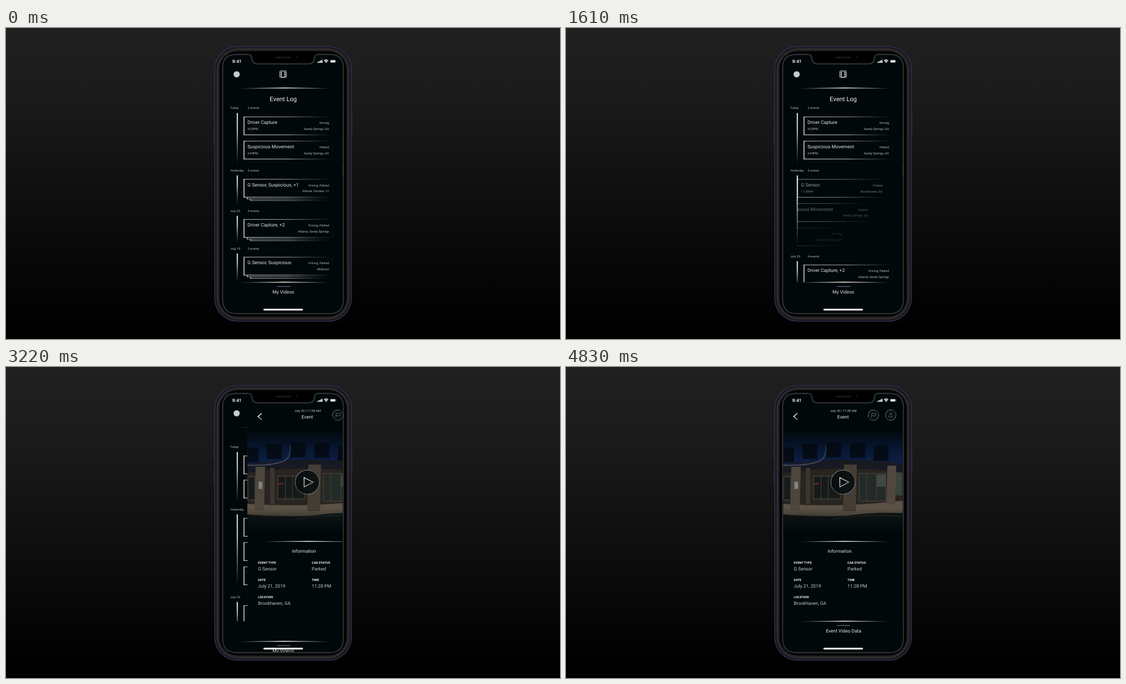
Animation, 998 px wide and 561 px high, one loop 4.9 s. Source, as an HTML page:

```html
<!DOCTYPE html>
<html lang="en">
<head>
<meta charset="utf-8">
<title>Event log</title>
<style>
html, body { margin: 0; width: 100%; height: 100%; overflow: hidden; background: #000; }
svg { display: block; width: 100vw; height: 100vh; }
text { font-family: Roboto, "Open Sans", sans-serif; text-rendering: geometricPrecision; white-space: pre; }
.clock { font-family: Inter, sans-serif; }
</style>
</head>
<body>
<svg id="stage" viewBox="0 0 998 561"></svg>
<script>
const BG = '#01080a';
const SCREEN = 'M391.5 72Q391.5 49 414 49H436Q441 49 441.5 54C442 62 446 66 453 66H545C552 66 556.5 62 557 54'
  + 'Q557.5 49 562 49H584Q606.5 49 606.5 72V490Q606.5 514 582 514H416Q391.5 514 391.5 490Z';

const gradient = (id, dir, stops) => `<linearGradient id="${id}" ${dir}>` + stops.map(([at, color, alpha = 1]) =>
  `<stop offset="${at}" stop-color="${color}" stop-opacity="${alpha}"/>`).join('') + '</linearGradient>';
const down = 'x2="0" y2="1"';
const rect = (x, y, w, h, fill, extra = '') =>
  `<rect x="${x}" y="${y}" width="${w}" height="${h}" fill="${fill}" ${extra}/>`;
const path = (d, fill, extra = '') => `<path d="${d}" fill="${fill}" ${extra}/>`;
const text = (x, y, s, size, fill = '#e6e8e8', anchor = 'start', weight = 400) =>
  `<text x="${x}" y="${y}" font-size="${size}" fill="${fill}" text-anchor="${anchor}" font-weight="${weight}">${s}</text>`;
const group = (id, content) => `<g id="${id}">${content}</g>`;

// Thin arched divider, brightest in the middle
const arc = (x, y) =>
  path(`M${x} ${y + 1.6}Q${x + 91} ${y - 2} ${x + 183} ${y + 1.6}Q${x + 91} ${y + .9} ${x} ${y + 1.6}Z`, 'url(#glow)');

function card(y, title, time, status, place, stacked) {
  let s = rect(0, 0, 161, 1, 'url(#edge)') + rect(0, 32.3, 161, 1.2, 'url(#edge)')
    + rect(0, 0, 1.4, 33.5, '#e4e4e4') + rect(160.5, 1, .6, 32, '#0c1618')
    + text(7, 13.4, title, 8.5) + text(7, 24.2, time, 5.6, '#b4b8b8')
    + text(154, 13.4, status, 5.6, '#b4b8b8', 'end') + text(154, 24.2, place, 5.6, '#b4b8b8', 'end');
  if (stacked) for (const [x, top] of [[6, 33.5], [12, 36.4]])
    s += rect(x, top, 1.2, 2.9, '#ddd') + rect(x, top + 2, 154 - x, .9, 'url(#edge)');
  return `<g transform="translate(428 ${y})">${s}</g>`;
}

const day = (y, name, count, lineId, length) =>
  text(404, y, name, 5.6, '#b4b8b8') + text(435.3, y, count + ' events', 5.6, '#b4b8b8')
  + rect(415.7, y + 7.2, 1.9, length, 'url(#stem)', `id="${lineId}"`);

function logPage() {
  let film = rect(493.3, 77.5, 11.6, 11.6, 'none', 'rx="1" stroke="#ddd"')
    + rect(496.4, 77.5, 5.4, 11.6, 'none', 'stroke="#ddd"');
  for (let i = 0; i < 3; i++)
    film += rect(493.5, 80 + i * 3, 3, 1, '#ddd') + rect(502, 80 + i * 3, 3, 1, '#ddd');
  const later = day(331.5, 'July 20', 4, 'stem2', 50)
    + card(344.8, 'Driver Capture, +2', '', 'Driving, Parked', 'Atlanta, Sandy Springs', true)
    + day(399.5, 'July 19', 3, 'stem3', 52)
    + card(412.8, 'G Sensor, Suspicious', '', 'Driving, Parked', 'Midtown', true);
  const opened = [
    ['G Sensor', '11:28PM', 'Parked', 'Brookhaven, GA'],
    ['Suspicious Movement', '7:45PM', 'Parked', 'Sandy Springs, GA'],
    ['Driver Capture', '3:20PM', 'Driving', 'Sandy Springs, GA']
  ].map((row, i) => group('card' + i, card(272.5 + i * 43.7, ...row))).join('');
  return '<circle cx="415.5" cy="83.5" r="5.5" fill="#c9cbcb"/>' + film + arc(410, 107.8)
    + text(499.5, 132, 'Event Log', 11.2, '#eee', 'middle')
    + '<g clip-path="url(#listClip)">'
    + day(146.3, 'Today', 2, 'stem0', 93)
    + card(159.8, 'Driver Capture', '4:20PM', 'Driving', 'Sandy Springs, GA')
    + card(203.5, 'Suspicious Movement', '3:45PM', 'Parked', 'Sandy Springs, GA')
    + '<g clip-path="url(#cardClip)">'
    + group('stack', card(272.3, 'G Sensor, Suspicious, +1', '', 'Driving, Parked', 'Atlanta, Decatur, +1', true))
    + opened + '</g>' + day(258.7, 'Yesterday', 3, 'stem1', 52) + group('later', later) + '</g>';
}

function photo() {
  let s = rect(391.5, 104, 215.5, 198, '#28241f')
    + path('M391 104H607V174Q500 160 391 175Z', '#0b1f48')
    + path('M391 175Q500 160 607 174V190Q500 176 391 191Z', '#171a22');
  for (const [x, y] of [[392, 145], [426, 139], [469, 136], [512, 137], [554, 142]])
    s += rect(x, y, x < 400 ? 19 : 27, 27, '#060d1b');
  // Shop windows, the right ones reflecting daylight
  for (const [x, y, w, h, glass] of [[391, 197, 15, 44, '#161b1b'], [445, 196, 50, 43, '#161a19'],
    [527, 191, 50, 52, '#232a28'], [592, 190, 15, 42, '#3b433f']])
    s += rect(x, y, w, h, '#3a3831') + rect(x + 2, y + 2, w - 4, h - 4, glass);
  for (const x of [459, 472, 541, 559]) s += rect(x, 194, 1, 47, '#45413a');
  s += rect(560, 194, 16, 22, '#3f4845')
    + path('M391 247Q500 254 607 241V263Q500 273 391 266Z', '#5b5245');
  for (const [x, y, w, h, fill] of [[406, 180, 17, 79, '#4d463d'], [501, 176, 23, 84, '#453d34'], [579, 178, 16, 70, '#50483e']])
    s += path(`M${x} ${y}h${w}l-2 ${h}h${-w}Z`, fill);
  s += rect(432, 182, 8, 72, '#3a352e') + rect(433, 250, 9, 12, '#5d5344')
    + rect(411.5, 207, 6.5, 13, '#85827c') + rect(447, 209, 9, 3, '#5e2422')
    + path('M391 177Q432 179 456 170Q470 164 468 142', 'none', 'stroke="#4c5b76" stroke-width="2.4" opacity=".7"')
    + path('M391 266Q455 273 510 268Q560 261 607 264V302H391Z', '#101615')
    + path('M480 275Q540 264 607 270', 'none', 'stroke="#2a3130" stroke-width="1.4"');
  return s + rect(391, 103, 216.5, 200, 'url(#veil)');
}

function eventPage() {
  const ring = x => `<circle cx="${x}" cy="86.8" r="9.4" fill="#040d0f" stroke="url(#rim)" stroke-width="1"/>`;
  const icon = d => path(d, 'none', 'stroke="#8b8f8f" stroke-width=".7"');
  const fields = [
    [410.3, 355, 'EVENT TYPE', 'G Sensor'], [507, 355, 'CAR STATUS', 'Parked'],
    [410.3, 386.2, 'DATE', 'July 21, 2019'], [507, 386.2, 'TIME', '11:28 PM'],
    [410.3, 417.4, 'LOCATION', 'Brookhaven, GA']
  ].map(([x, y, name, value]) =>
    text(x, y, name, 5.65, '#f2f2f2', 'start', 700) + text(x, y + 11.7, value, 8.35, '#c6c9c9')).join('');
  return rect(391.7, 67, 217, 450, BG)
    + path('M417 83.3L410.3 89.3L417 95.2', 'none', 'stroke="url(#chevron)" stroke-width="1.7"')
    + text(499.5, 81.4, 'July 20 | 11:28 AM', 5.8, '#c4c7c7', 'middle') + text(499.2, 93, 'Event', 8.5, '#e6e8e8', 'middle')
    + ring(553.8) + icon('M550.8 91V83.6Q552.5 82.5 554.5 83.6T558 83.6V88Q556 89 554.4 88T550.8 88')
    + ring(585) + icon('M582.5 87.5Q579 90.3 585 90.5T587.5 87.5M585 83a1.8 1.8 0 1 1-.1 0')
    + photo()
    + '<circle cx="499" cy="207.8" r="21.8" fill="#080e10" fill-opacity=".9" stroke="url(#rim)" stroke-width="1.1"/>'
    + path('M493.3 199.5L509.5 207.8L493.3 216.3Z', 'none', 'stroke="url(#chevron)" stroke-width="1.3"')
    + arc(410, 314) + text(493, 335.2, 'Information', 8.4, '#e0e2e2', 'middle') + fields;
}

const bottomBar = rect(391, 458.6, 217, 60, BG) + arc(410, 458) + rect(488, 465.8, 24, 1.1, '#74758c')
  + group('videos', text(499.6, 479.2, 'My Videos', 8.4, '#e6e8e8', 'middle'))
  + group('data', text(500, 479.2, 'Event Video Data', 8.45, '#e6e8e8', 'middle'));

function statusBar() {
  const bars = [0, 1, 2, 3].map(i => rect(561.3 + i * 2.4, 61 - i * 1.2, 1.7, 2 + i * 1.2, '#fff', 'rx=".4"')).join('');
  const wifi = path('M573 59.2Q576.7 55.8 580.4 59.2M574.5 61Q576.7 59 578.9 61', 'none', 'stroke="#fff" stroke-width="1.2"')
    + '<circle cx="576.7" cy="62.2" r=".9" fill="#fff"/>';
  return '<text class="clock" x="407.6" y="63" font-size="7.8" font-weight="600" fill="#fff">9:41</text>' + bars + wifi
    + rect(583.9, 57.6, 10, 5, 'none', 'rx="1.5" stroke="#777" stroke-width=".5"')
    + rect(584.6, 58.2, 8.6, 3.8, '#fff', 'rx="1"') + rect(594.6, 59.3, .7, 1.8, '#777');
}

function phone() {
  let s = '';
  for (const [x, y, h] of [[373.2, 101, 15], [373.2, 139, 28], [373.2, 181, 28], [622.3, 151, 42]])
    s += rect(x, y, 3, h, '#211e2b', 'rx="1"');
  return s + rect(376.2, 33.8, 245.8, 495, '#14121c', 'rx="41" stroke="#302b43" stroke-width="2"')
    + rect(380, 37.4, 238, 487.8, '#272625', 'rx="38" stroke="#3d3c3b" stroke-width="1"')
    + rect(384.4, 41.8, 229.2, 478.8, '#000', 'rx="33" stroke="#111" stroke-width="1"')
    + path(SCREEN, BG, 'stroke="#2a2e30" stroke-width="5" paint-order="stroke"')
    + rect(485, 51.8, 29, 3, '#171718', 'rx="1.5"') + '<circle cx="524" cy="53" r="1.9" fill="#15152c"/>';
}

document.getElementById('stage').innerHTML = '<defs>'
  + gradient('back', down, [[0, '#202021'], [.25, '#1a1a1b'], [.6, '#0d0d0e'], [.97, '#000']])
  + gradient('glow', '', [[0, '#fff', 0], [.25, '#ccc', .6], [.5, '#fff'], [.75, '#ccc', .6], [1, '#fff', 0]])
  + gradient('edge', '', [[0, '#fff', .75], [.5, '#ddd', .7], [.8, '#bbb', .3], [1, '#999', 0]])
  + gradient('stem', down, [[0, '#fff'], [.35, '#ddd', .95], [1, '#999', 0]])
  + gradient('rim', 'y2="1"', [[0, '#a2a5a5'], [.5, '#4c5152'], [1, '#8b8e8e']])
  + gradient('chevron', 'y2="1"', [[0, '#fff'], [1, '#777']])
  + gradient('veil', down, [[0, BG], [.06, BG, .95], [.26, BG, .25], [.35, BG, 0], [.76, BG, 0], [.88, BG, .5], [.98, BG]])
  + `<clipPath id="screenClip"><path d="${SCREEN}"/></clipPath>`
  + `<clipPath id="listClip">${rect(391, 130, 217, 328.5, '#fff')}</clipPath>`
  + `<clipPath id="cardClip">${rect(416.6, 262, 191, 200, '#fff')}</clipPath></defs>`
  + rect(0, 0, 998, 561, 'url(#back)') + phone()
  + '<g clip-path="url(#screenClip)">' + logPage() + group('event', eventPage()) + group('bar', bottomBar)
  + statusBar() + rect(463.7, 506.5, 71.3, 2.9, '#fff', 'rx="1.45"') + '</g>';

const el = id => document.getElementById(id);
const progress = (t, start, length) => Math.min(1, Math.max(0, (t - start) / length));
const easeInOut = p => p < .5 ? 4 * p ** 3 : 1 - 4 * (1 - p) ** 3;
const move = (id, x, y = 0) => el(id).setAttribute('transform', `translate(${x} ${y})`);
const fade = (id, alpha) => el(id).setAttribute('opacity', alpha);

function draw(t) {
  // The stacked card leaves behind the stem, three single cards follow
  const leave = progress(t, 1070, 400);
  move('stack', -180 * leave ** 2.6);
  fade('stack', 1 - leave ** 1.5);
  for (let i = 0; i < 3; i++) {
    const p = progress(t, 1187 + i * 130, 650);
    move('card' + i, -180 * (1 - p) ** 2.6);
    fade('card' + i, p);
  }
  const push = 85.2 * easeInOut(progress(t, 1120, 620));
  move('later', 0, push);
  el('stem1').setAttribute('height', 52 + push * .92);

  // The event page comes from the right while the bottom bar dips and returns
  move('event', 215 * (1 - progress(t, 3061, 484)) ** 4);
  const dip = t < 3260 ? progress(t, 3080, 180) ** 2 : (1 - progress(t, 3260, 350)) ** 2;
  move('bar', 0, 60 * dip);
  fade('videos', t < 3260 ? 1 : 0);
  fade('data', t < 3260 ? 0 : 1);
}

const STEP = 70, LOOP = 4900;
const began = performance.now();
function tick() {
  const t = (performance.now() - began) % LOOP;
  draw(Math.floor(t / STEP) * STEP);
  requestAnimationFrame(tick);
}
tick();
</script>
</body>
</html>
```
